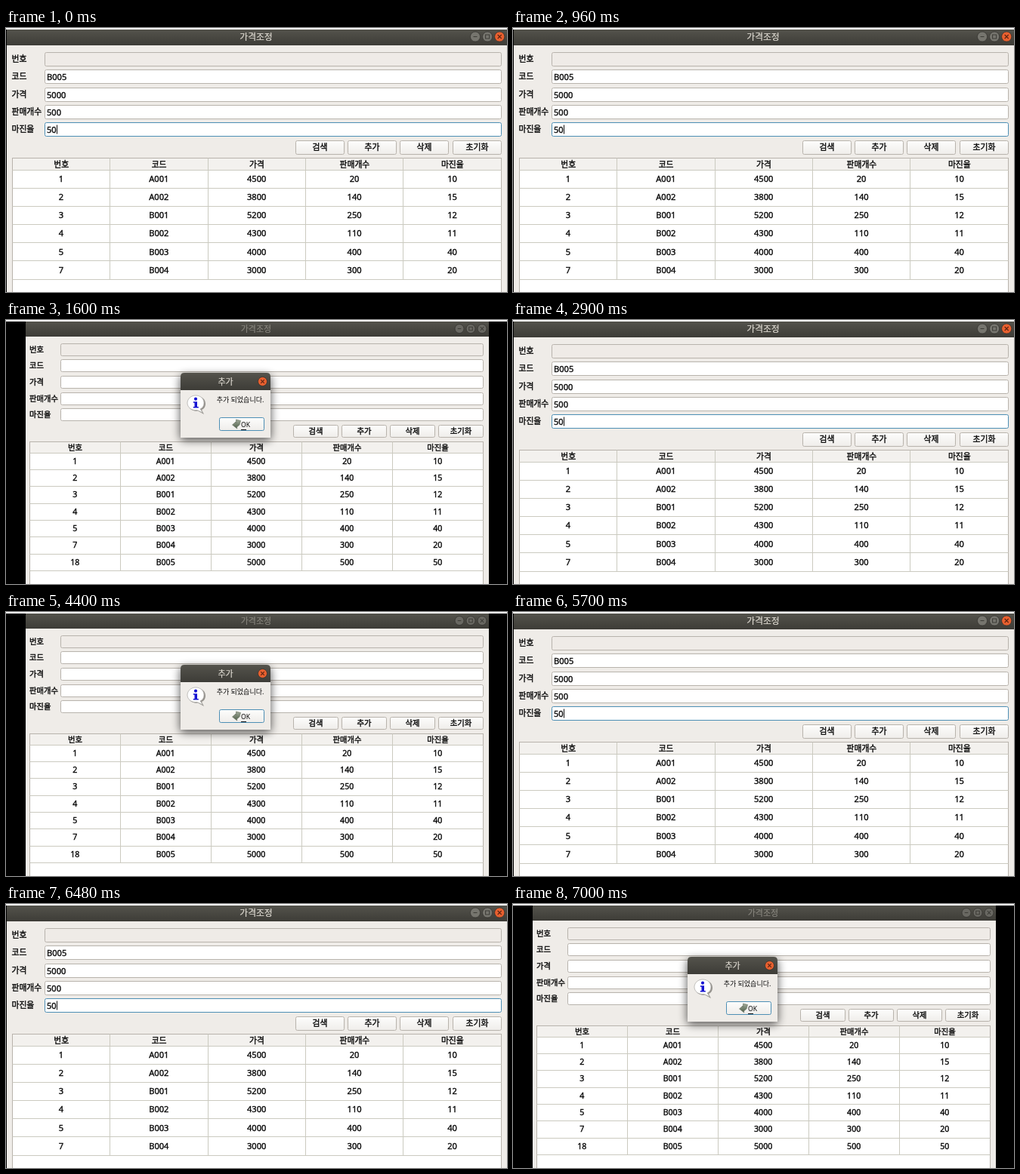
Recreate the animation shown at these times as an HTML page. Size 663 px wide and 350 px high, loop 8.1 s.

```html
<!DOCTYPE html>
<html lang="ko">
<head>
<meta charset="utf-8">
<style>
html, body { margin: 0; width: 100%; height: 100%; overflow: hidden; background: #fff; }
svg { display: block; width: 663px; height: 350px; }
text { font-family: "Noto Sans", "Noto Sans CJK KR", "Noto Sans CJK", sans-serif; font-weight: 500; fill: #0c0c0c; white-space: pre; }
.strong { stroke: #0c0c0c; stroke-width: .38px; }
</style>
</head>
<body>
<svg id="stage" viewBox="0 0 663 350">
  <defs>
    <linearGradient id="bar" x2="0" y2="1"><stop stop-color="#54534c"/><stop offset="1" stop-color="#3d3c37"/></linearGradient>
    <linearGradient id="face" x2="0" y2="1"><stop stop-color="#fdfdfc"/><stop offset="1" stop-color="#efedea"/></linearGradient>
    <linearGradient id="leaf" x2="0" y2="1"><stop stop-color="#a3aa9b"/><stop offset="1" stop-color="#4d5f48"/></linearGradient>
    <filter id="blur" x="-30%" y="-30%" width="160%" height="160%"><feGaussianBlur stdDeviation="6"/></filter>
  </defs>
</svg>
<script>
const stage = document.getElementById('stage');
const PAPER = '#efece8', EDGE = '#b8b3ac', GRID = '#cbcac0', BLUE = '#4d8fb5', ORANGE = '#e9602f';
const LABELS = ['번호', '코드', '가격', '판매개수', '마진율'];
const BUTTONS = ['검색', '추가', '삭제', '초기화'];
const ROWS = [
  '1 A001 4500 20 10', '2 A002 3800 140 15', '3 B001 5200 250 12', '4 B002 4300 110 11',
  '5 B003 4000 400 40', '7 B004 3000 300 20', '18 B005 5000 500 50'
].map(r => r.split(' '));

const rect = (x, y, w, h, fill, extra = '') =>
  `<rect x="${x}" y="${y}" width="${w}" height="${h}" fill="${fill}" ${extra}/>`;
const box = (x, y, w, h, fill, stroke = EDGE, r = 2) =>
  rect(x, y, w, h, fill, `rx="${r}" stroke="${stroke}"`);
const line = (x1, y1, x2, y2, color = GRID) =>
  `<path d="M${x1} ${y1}L${x2} ${y2}" stroke="${color}" fill="none"/>`;
// Text centred vertically on cy
const text = (s, x, cy, size, anchor = 'middle', extra = 'class="strong"') =>
  `<text x="${x}" y="${(cy + size * .365).toFixed(2)}" font-size="${size}" text-anchor="${anchor}" ${extra}>${s}</text>`;
const ink = color => `style="fill:${color};stroke:${color};stroke-width:.2px"`;
const snap = v => Math.floor(v) + .5;

function knob(x, y, r, kind, fill, color) {
  const k = r * .38;
  const mark = {
    min: `M${x - k} ${y}H${x + k}`,
    max: `M${x - k} ${y - k}h${2 * k}v${2 * k}h${-2 * k}z`,
    close: `M${x - k} ${y - k}l${2 * k} ${2 * k}m0 ${-2 * k}l${-2 * k} ${2 * k}`
  }[kind];
  return `<circle cx="${x}" cy="${y}" r="${r}" fill="${fill}" stroke="#34332f" stroke-width=".8"/>
    <path d="${mark}" fill="none" stroke="${color}" stroke-width="1.1"/>`;
}

function panel(o) {
  let s = rect(o.left, 2, o.right - o.left, 348, PAPER) +
    rect(o.left, 2, o.right - o.left, o.barH, 'url(#bar)') +
    text('가격조정', o.titleX, 12, o.titleSize, 'middle', ink(o.titleInk));
  ['min', 'max', 'close'].forEach((kind, i) => {
    const hot = o.active && kind === 'close';
    s += knob(o.knobX + i * o.knobStep, o.knobY, o.knobR, kind, hot ? ORANGE : o.knobFill, hot ? '#5b2413' : '#3f3e39');
  });

  LABELS.forEach((label, i) => {
    const y = snap(o.fieldY + i * o.fieldStep), cy = y + o.fieldH / 2;
    const focus = o.active && i === 4;
    s += text(label, o.labelX, cy, o.size - .3, 'start') +
      box(o.fieldX, y, o.tableR - o.fieldX, o.fieldH, i ? '#fff' : '#efebe7', focus ? BLUE : EDGE);
    if (o.values[i]) s += text(o.values[i], o.fieldX + 2.5, cy, o.size, 'start');
    if (focus) s += line(67.5, y + 3, 67.5, y + 15, '#111');
  });

  BUTTONS.forEach((label, i) => {
    const x = snap(o.btnX + i * o.btnStep);
    s += box(x, o.btnY, o.btnW, o.btnH, 'url(#face)') +
      text(label, x + o.btnW / 2, o.btnY + o.btnH / 2, o.size - .3);
  });

  const colW = (o.tableR - o.tableL) / 5, bottom = o.rowY + o.count * o.rowH;
  s += rect(o.tableL, o.tableY, o.tableR - o.tableL, 360 - o.tableY, '#fff', `stroke="${EDGE}"`) +
    rect(o.tableL + .5, o.tableY + .5, o.tableR - o.tableL - 1, o.rowY - o.tableY, '#f3f1ee') +
    line(o.tableL, snap(o.rowY), o.tableR, snap(o.rowY));
  for (let c = 0; c < 5; c++) {
    const cx = o.tableL + colW * (c + .5), x = snap(o.tableL + colW * c - .2);
    s += text(LABELS[c], cx, (o.tableY + o.rowY) / 2 + .5, o.size - .3);
    for (let r = 0; r < o.count; r++)
      s += text(ROWS[r][c], cx - .3, o.rowY + o.rowH * (r + .5) - .3, o.size);
    if (c) s += line(x, o.tableY, x, bottom);
  }
  for (let r = 1; r <= o.count; r++) {
    const y = snap(o.rowY + r * o.rowH);
    s += line(o.tableL, y, o.tableR, y);
  }
  return s;
}

function dialog() {
  return rect(230, 73, 121, 87, '#000', 'rx="6" opacity=".6" filter="url(#blur)"') +
    rect(231, 70, 119, 86, PAPER, 'rx="5"') + rect(231, 90, 119, 66, PAPER) +
    '<path d="M231 93V75q0-5 5-5H345q5 0 5 5V93z" fill="url(#bar)"/>' +
    text('추가', 290.5, 82, 11, 'middle', ink('#dfdbd2')) +
    knob(339.5, 81.5, 6, 'close', ORANGE, '#5b2413') +
    '<path d="M252 101c7 0 12 4 12 10 0 4-2 7-5 8l3 6-8-4.500c-8 1-13-4-13-9.500 0-6 5-10 11-10z" fill="#77746f" opacity=".75"/>' +
    '<path d="M251 100c6.500 0 11 4.500 11 10 0 4-2 6.500-5 8l3.500 5-7.500-3.500c-8 .8-13-4-13-9.500 0-5.500 5-10 11-10z" fill="#fff" stroke="#aaa8a4" stroke-width=".7"/>' +
    '<circle cx="251" cy="104.700" r="2.100" fill="#1714d2"/><path d="M247.800 108.300H253v6.700h1.800v1.500h-7V115h1.700v-5.200h-1.700z" fill="#1714d2"/>' +
    text('추가 되었습니다.', 310, 106, 9, 'middle', '') +
    box(282.5, 129.5, 59, 17, 'url(#face)', BLUE) +
    '<path d="M304.500 132l6 1.500-1.500 5.500-3.500 3 .3 2-6.300-5 4.500-4 .5 2z" fill="url(#leaf)" stroke="#66705f" stroke-width=".6"/>' +
    text('OK', 311, 138.7, 8.6, 'start', '') +
    line(311, 145.5, 318, 145.5, '#161616');
}

const editing = panel({
  active: true, left: 1, right: 663, barH: 21, titleX: 331, titleSize: 11.8, titleInk: '#dfdbd2',
  knobX: 621, knobStep: 16.1, knobY: 11.5, knobR: 6.6, knobFill: '#76756e',
  size: 11.1, labelX: 7.5, fieldX: 51.5, fieldY: 32.3, fieldStep: 23.4, fieldH: 18,
  values: ['', 'B005', '5000', '500', '50'],
  btnX: 383, btnStep: 69.4, btnY: 149.5, btnW: 64, btnH: 18,
  tableL: 8.5, tableR: 655.5, tableY: 172.5, rowY: 188.1, rowH: 24.15, count: 6
}) + rect(0, 2, 1, 348, '#000');

const added = rect(0, 2, 663, 348, '#000') + panel({
  active: false, left: 26, right: 639, barH: 20, titleX: 331, titleSize: 11, titleInk: '#88867e',
  knobX: 600, knobStep: 15, knobY: 11.5, knobR: 6, knobFill: '#696862',
  size: 10.6, labelX: 31, fieldX: 72.5, fieldY: 31, fieldStep: 21.7, fieldH: 16,
  values: [],
  btnX: 380, btnStep: 64, btnY: 139.5, btnW: 59, btnH: 16,
  tableL: 31.5, tableR: 631.5, tableY: 161.5, rowY: 176, rowH: 22.35, count: 7
}) + dialog();

stage.insertAdjacentHTML('beforeend', `<g>${editing}</g><g>${added}</g>`);
const [editView, addView] = stage.querySelectorAll(':scope > g');
const CUTS = [1600, 2900, 4400, 5700, 7000], LOOP = 8100;
const start = performance.now();

function draw(ms) {
  const isAdded = CUTS.filter(cut => ms >= cut).length % 2 === 1;
  editView.style.display = isAdded ? 'none' : '';
  addView.style.display = isAdded ? '' : 'none';
}
function tick() {
  draw((performance.now() - start) % LOOP);
  requestAnimationFrame(tick);
}
draw(0);
requestAnimationFrame(tick);
</script>
</body>
</html>
```
